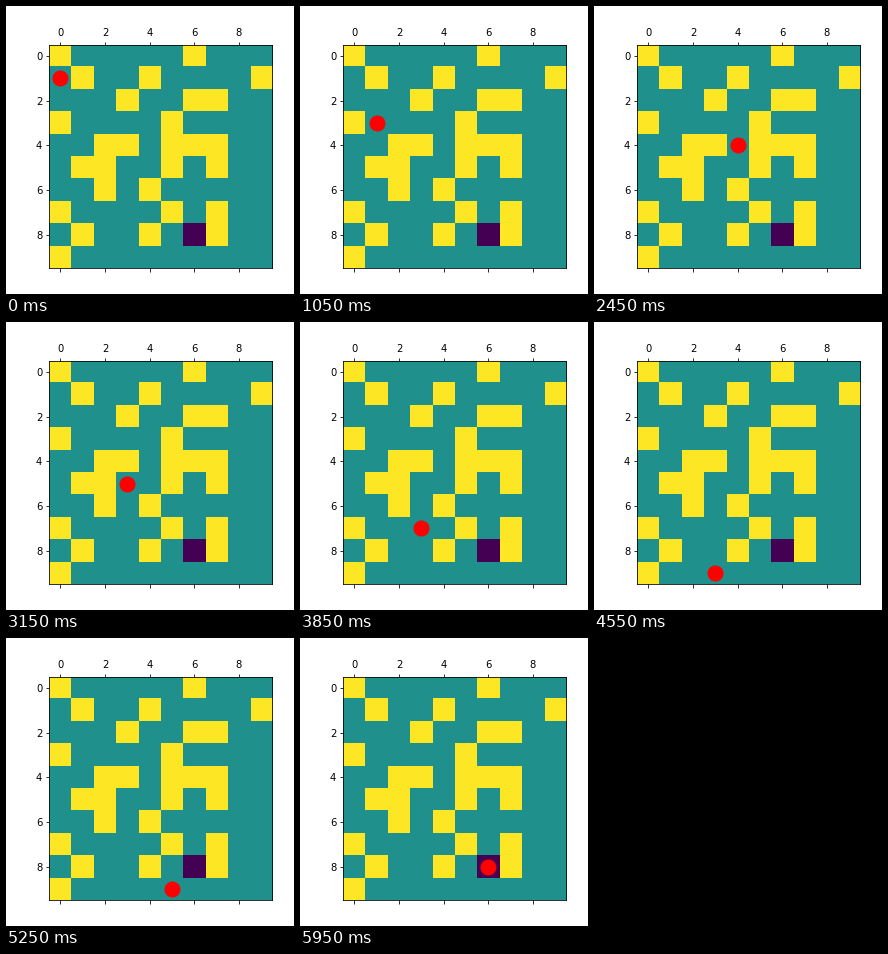
Animation of 288 by 288 pixels, one loop 6.3 s. Source, as a matplotlib script:

```python
import matplotlib.pyplot as plt
import numpy as np
from matplotlib.animation import FuncAnimation

STEP_MS = 350
START = (0, 1)
GOAL = (6, 8)
MOVES = "DRDRRRDDLDDDDRRRU"
DELTA = {"U": (0, -1), "D": (0, 1), "L": (-1, 0), "R": (1, 0)}

MAZE = """
#.....#...
.#..#....#
...#..##..
#....#....
..##.###..
.##..#.#..
..#.#.....
#....#.#..
.#..#..#..
#.........
""".split()


def walk(start, moves):
    """Every cell visited, beginning with the start cell."""
    return np.cumsum([start] + [DELTA[m] for m in moves], axis=0)


grid = np.array([[1 if c == "#" else 0 for c in row] for row in MAZE])
grid[GOAL[1], GOAL[0]] = -1
path = walk(START, MOVES)

fig = plt.figure(figsize=(4, 4), dpi=72)
ax = fig.add_axes([0.15, 0.09, 0.775, 0.775])
ax.matshow(grid, cmap="viridis", vmin=-1, vmax=1)
ax.set_autoscale_on(False)
agent, = ax.plot(*START, "ro", markersize=15)


def update(i):
    x, y = path[i]
    agent.set_data([x], [y])
    return agent,


anim = FuncAnimation(fig, update, frames=len(path), interval=STEP_MS,
                     repeat=True, repeat_delay=0)
plt.show()
```
